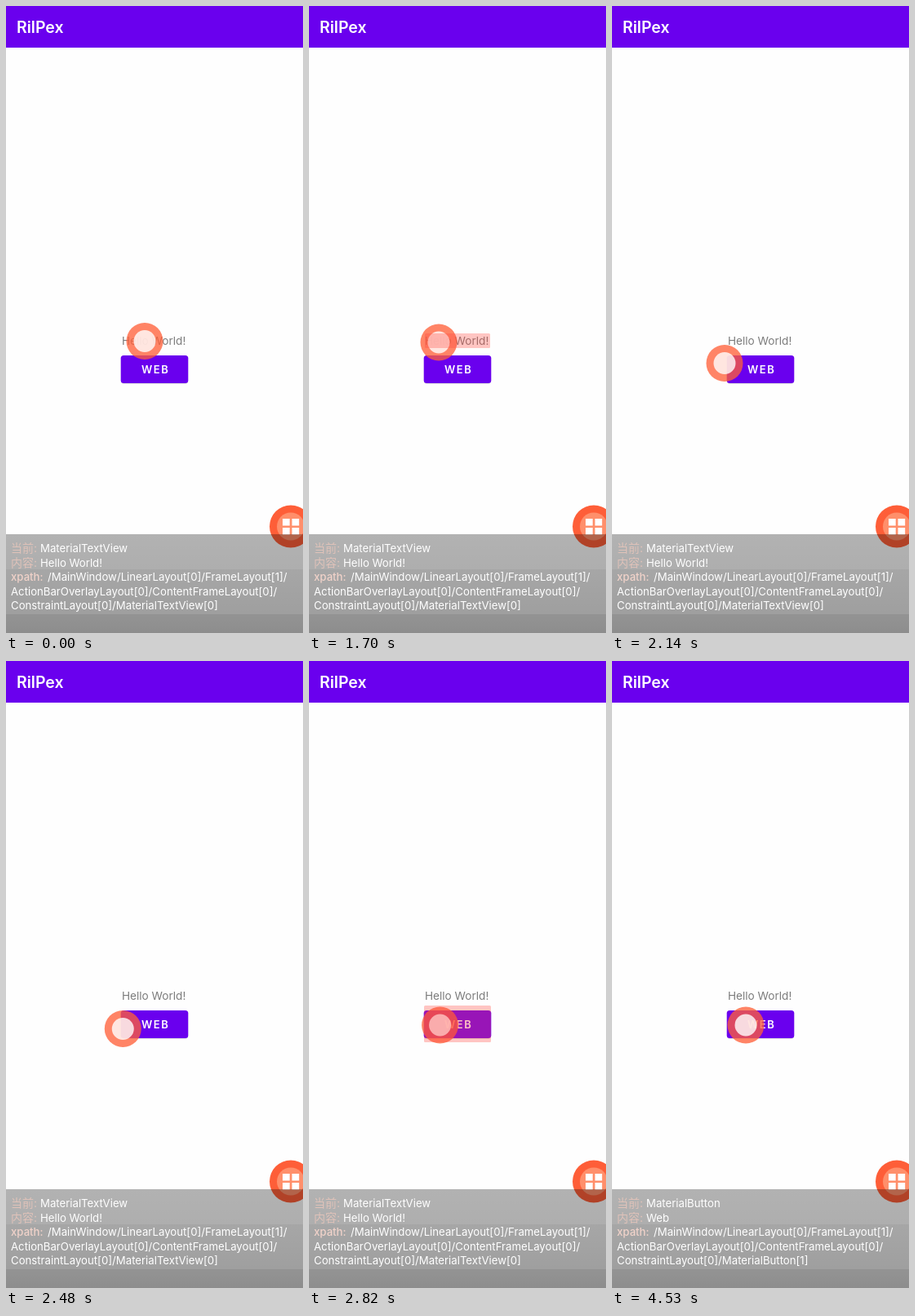
Recreate the animation shown at these times as an HTML page. Size 364 px wide and 768 px high, loop 4.89 s.

```html
<!DOCTYPE html>
<html lang="en">
<head>
<meta charset="utf-8">
<title>View inspector</title>
<style>
  html, body { margin: 0; width: 100%; height: 100%; overflow: hidden; background: #fefefe; }
  svg { display: block; width: 100%; height: 100%; font: 13.2px Inter, "Noto Sans CJK SC", "Noto Sans CJK", sans-serif; }
  text { white-space: pre; }
  .title { font-size: 19.5px; font-weight: 600; }
  .hello { font-size: 13.6px; }
  .button { font-size: 13px; font-weight: 600; letter-spacing: 1.6px; }
  .label { font-size: 14px; fill: #dfc2b9; }
  .xpath { font-weight: 500; fill: #f0d2c9; }
</style>
</head>
<body>
<svg viewBox="0 0 364 768">
  <defs>
    <linearGradient id="panelShade" x2="0" y2="1">
      <stop stop-opacity=".3"/>
      <stop offset=".355" stop-opacity=".315"/>
      <stop offset=".355" stop-opacity=".345"/>
      <stop offset=".81" stop-opacity=".375"/>
      <stop offset=".81" stop-opacity=".42"/>
      <stop offset="1" stop-opacity=".445"/>
    </linearGradient>
  </defs>

  <rect width="364" height="768" fill="#fefefe"/>
  <rect width="364" height="51" fill="#6a00ee"/>
  <text class="title" x="13" y="32.5" fill="#fff">RilPex</text>

  <text class="hello" x="142" y="415" fill="#7c7c7c">Hello World!</text>
  <rect x="141" y="429" width="82" height="34" rx="4" fill="#ddd"/>
  <rect x="140.7" y="428" width="82.6" height="34" rx="3.5" fill="#6a00ee"/>
  <text class="button" x="166" y="450" fill="#fff">WEB</text>

  <g id="marker">
    <circle r="22.5" fill="#ff5f38" fill-opacity=".77"/>
    <circle r="13.5" fill="#fff" fill-opacity=".8"/>
  </g>
  <g fill="#ff463c" fill-opacity=".31">
    <rect id="textHighlight" x="142" y="401" width="80" height="18" rx="1.5"/>
    <rect id="buttonHighlight" x="141" y="422" width="82" height="45" rx="1.5"/>
  </g>

  <circle cx="349" cy="637.5" r="26" fill="#fe5e38"/>
  <circle cx="349" cy="637.5" r="17" fill="#ff8f6b"/>
  <path d="M339 628h8.7v8.5h-8.7zM350.5 628h8.7v8.5h-8.7zM339 639h8.7v8.5h-8.7zM350.5 639h8.7v8.5h-8.7z" fill="#fff"/>

  <rect y="647" width="364" height="121" fill="url(#panelShade)"/>
  <g fill="#fff">
    <text class="label" x="6" y="669">当前:</text>
    <text id="viewName" x="42" y="669"></text>
    <text class="label" x="6" y="686.5">内容:</text>
    <text id="content" x="42" y="686.5"></text>
    <text class="xpath" x="6" y="704">xpath:</text>
    <text x="51" y="704">/MainWindow/LinearLayout[0]/FrameLayout[1]/</text>
    <text x="6" y="721.5">ActionBarOverlayLayout[0]/ContentFrameLayout[0]/</text>
    <text id="pathEnd" x="6" y="739"></text>
  </g>
</svg>
<script>
const LOOP = 4890, DRAG_START = 1700, STEP = 86.1;
const REST = [170, 410.5];
// Drag path: time, x, y
const DRAG = [
  [1700, 159, 412], [1880, 146, 419], [2050, 139, 432], [2130, 138, 437.5],
  [2230, 137.5, 443], [2310, 138, 447.5], [2400, 140, 450.5], [2470, 143, 450.5],
  [2650, 153, 448], [2815, 160.5, 446], [2990, 164, 446]
];
const byId = id => document.getElementById(id);
const show = (id, visible) => byId(id).setAttribute("visibility", visible ? "visible" : "hidden");

function markerAt(time) {
  if (time < DRAG_START) return REST;
  const next = DRAG.findIndex(key => key[0] > time);
  if (next < 0) return DRAG.at(-1).slice(1);
  const [t0, x0, y0] = DRAG[next - 1], [t1, x1, y1] = DRAG[next];
  const k = (time - t0) / (t1 - t0);
  return [x0 + (x1 - x0) * k, y0 + (y1 - y0) * k];
}

function render(time) {
  const held = DRAG_START + Math.floor((time - DRAG_START) / STEP) * STEP;
  byId("marker").setAttribute("transform", `translate(${markerAt(held)})`);
  show("textHighlight", time >= DRAG_START && time < 1960);
  show("buttonHighlight", time >= 2560 && time < 3270);

  const onButton = time >= 3270;
  const name = onButton ? "MaterialButton" : "MaterialTextView";
  byId("viewName").textContent = name;
  byId("content").textContent = onButton ? "Web" : "Hello World!";
  byId("pathEnd").textContent = `ConstraintLayout[0]/${name}[${onButton ? 1 : 0}]`;
}

const start = performance.now();
function tick() {
  render((performance.now() - start) % LOOP);
  requestAnimationFrame(tick);
}
tick();
</script>
</body>
</html>
```
